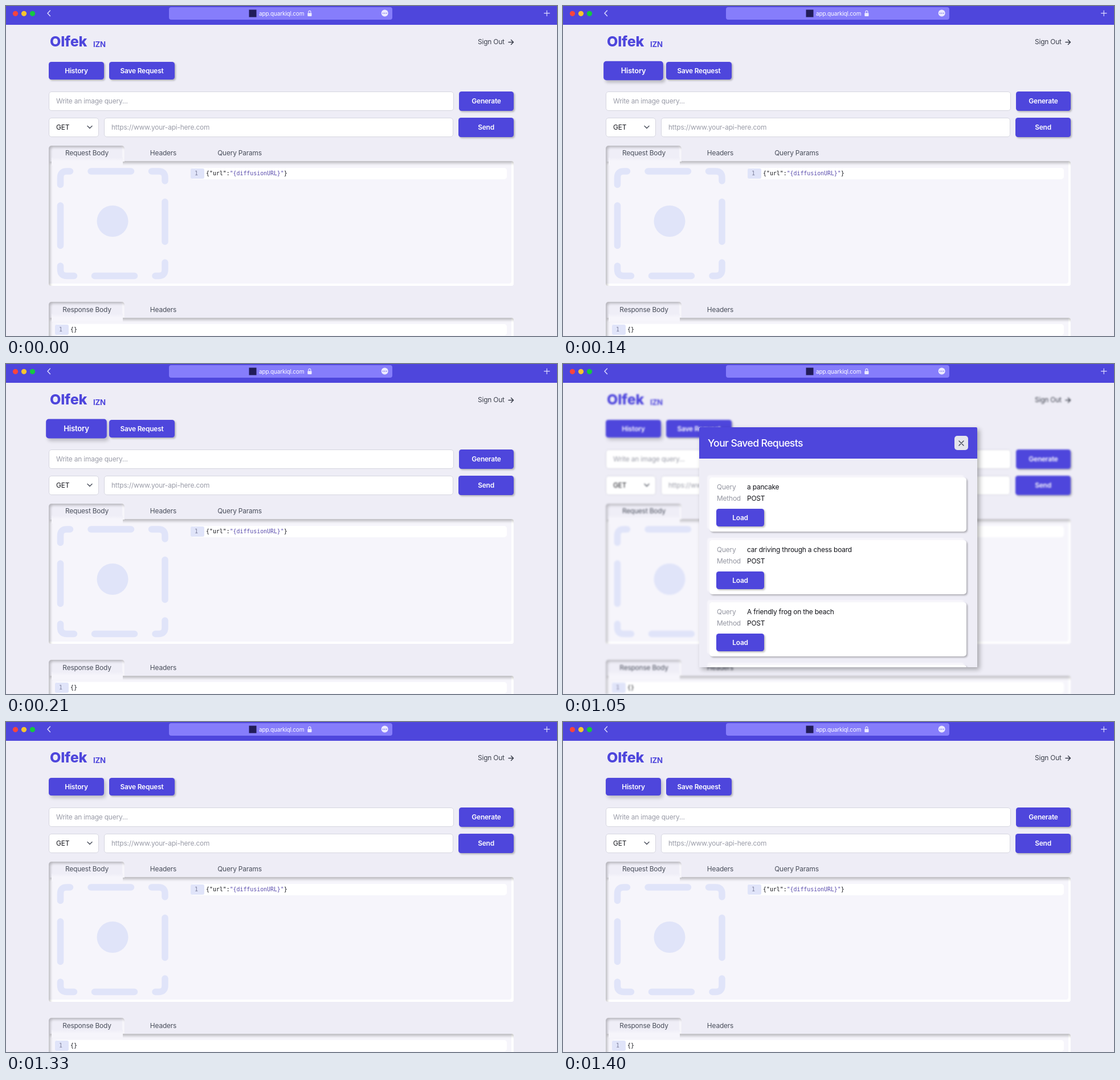
Animation, 967 px wide and 579 px high, one loop 2.17 s. Source, as an HTML page:

```html
<!DOCTYPE html>
<html lang="en">
<head>
<meta charset="utf-8">
<title>Saved requests</title>
<style>
:root { --indigo: #4e46dc; --bg: #eeedf6; --panel: #f6f5fb; --pale: #e0e4f9; --loop: 2170ms step-end infinite; }
html, body { margin: 0; width: 100%; height: 100%; overflow: hidden; background: var(--bg); }
body { position: relative; font: 11.9px/20px Inter, sans-serif; letter-spacing: -.015em; color: #111218; }
div, span, svg { position: absolute; box-sizing: border-box; white-space: pre; }
svg { left: 0; top: 0; width: 967px; height: 579px; fill: none; stroke-linecap: round; stroke-linejoin: round; }
.stage { left: 0; top: 0; width: 967px; height: 579px; overflow: hidden; }

.bar { left: 0; top: 0; width: 967px; height: 33px; background: var(--indigo); }
.pill { left: 286px; top: 2px; width: 392px; height: 22px; border-radius: 4px; background: #867dfb; }
.address { left: 444px; top: 3px; font-size: 10px; color: #fff; }

.button { display: flex; align-items: center; justify-content: center; border-radius: 4.5px;
  background: var(--indigo); color: #fff; font-weight: 600; box-shadow: 2px 2px 3px #00000040; }
.field { background: #fff; border: 1px solid #d6d6e0; border-radius: 5px; }
.field span { left: 12px; top: 6px; color: #9a9ca8; }
.label { width: 134px; text-align: center; color: #4a4f5c; }
.brand { left: 77px; top: 46px; font-weight: 800; font-size: 25px; line-height: 32px; color: var(--indigo); }
.brand-tail { left: 153px; top: 51px; font-weight: 700; font-size: 13.2px; line-height: 32px; color: var(--indigo); }

.tab { left: 75px; width: 133px; height: 28px; border-radius: 5px 5px 0 0; background: #efeef7;
  box-shadow: inset 3px 3px 4px #0000003a, inset -4px 0 2px #f7f6fb; }
.panel { left: 75px; width: 816px; height: 219px; border-radius: 0 4px 4px 4px; background: var(--panel);
  box-shadow: inset 3px 4px 4px #00000038, inset -4px -4px 1px #fff; }
.join { left: 80px; width: 125px; height: 14px; background: linear-gradient(#efeef7, var(--panel) 45%); }
.code { height: 20px; background: #fff; border-radius: 5px; font: 9.9px/19px "DejaVu Sans Mono", monospace; letter-spacing: 0; }
.code span { left: 27px; }
.code .gutter { left: 0; top: 1px; width: 24px; height: 18px; padding-right: 4px; text-align: center; line-height: 18px;
  border-radius: 3px; background: var(--pale); color: #7c7f9c; }
.code i { font-style: normal; color: #5a4cad; }

.modal { left: 239px; top: 111px; width: 488px; height: 421px; background: var(--bg); box-shadow: 4px 4px 8px #0000004d; }
.clip { inset: 0; overflow: hidden; }
.head { left: 0; top: 0; width: 488px; height: 55px; background: var(--indigo); border-radius: 2px 2px 0 0; }
.title { left: 15px; top: 13px; font-size: 17.6px; line-height: 30px; font-weight: 500; letter-spacing: -.6px; color: #fff; }
.card { left: 18px; width: 451px; height: 95px; border-radius: 5px; background: #fff;
  box-shadow: 2px 2px 3px #00000045, -4px -4px 2px #f7f6fb; }
.card span { left: 66px; }
.card .key { left: 13px; color: #9496a1; }
.card .button { left: 12px; top: 55px; width: 84px; height: 31px; }
.close-box { left: 448px; top: 15px; width: 24px; height: 25px; border-radius: 5px; background: #e4e5ec; }

.page { animation: blur var(--loop); }
.history { animation: hover var(--loop); }
.modal { animation: open var(--loop); }
.close-box { animation: point var(--loop); }
.cross { stroke: #fff; animation: darken var(--loop); }
@keyframes hover {
  0% { transform: none; }
  3.22% { transform: scale(1.025); box-shadow: 2px 3px 4px #0000003a; }
  6.45% { transform: scale(1.08); box-shadow: 3px 4px 5px #00000036; }
  9.67%, 19.35% { transform: scale(1.1); box-shadow: 3px 4px 6px #00000036; }
  48.38%, 100% { transform: none; }
}
@keyframes blur { 0%, 61.29%, 100% { filter: none; } 19.35% { filter: blur(1.8px); } }
@keyframes open { 0%, 61.29%, 100% { opacity: 0; } 19.35% { opacity: 1; } }
@keyframes point { 0%, 61.29%, 100% { opacity: 0; } 48.38% { opacity: 1; } }
@keyframes darken { 0%, 61.29%, 100% { stroke: #fff; } 48.38% { stroke: #3f4553; } }
</style>
</head>
<body>
<div class="stage page">
  <span class="brand">Olfek</span><span class="brand-tail">IZN</span>
  <span style="left:828px;top:53px;color:#3c404c">Sign Out</span>

  <div class="button history" style="left:75px;top:98px;width:97px;height:31px">History</div>
  <div class="button" style="left:181px;top:98px;width:115px;height:31px">Save Request</div>
  <div class="field" style="left:75px;top:150px;width:711px;height:34px"><span>Write an image query...</span></div>
  <div class="button" style="left:795px;top:150px;width:96px;height:34px">Generate</div>
  <div class="field" style="left:75px;top:196px;width:88px;height:34px"><span style="color:#17181f">GET</span></div>
  <div class="field" style="left:172px;top:196px;width:613px;height:34px"><span>https://www.your-api-here.com</span></div>
  <div class="button" style="left:794px;top:196px;width:97px;height:34px">Send</div>

  <div class="panel" style="top:272px"></div>
  <div class="tab" style="top:245px"></div>
  <div class="join" style="top:266px"></div>
  <span class="label" style="left:75px;top:248px">Request Body</span>
  <span class="label" style="left:209px;top:248px">Headers</span>
  <span class="label" style="left:343px;top:248px">Query Params</span>
  <div class="code" style="left:324px;top:284px;width:555px"><span class="gutter">1</span><span>{"url":<i>"{diffusionURL}"</i>}</span></div>

  <div class="panel" style="top:547px"></div>
  <div class="tab" style="top:519px"></div>
  <div class="join" style="top:540px"></div>
  <span class="label" style="left:75px;top:523px">Response Body</span>
  <span class="label" style="left:209px;top:523px">Headers</span>
  <div class="code" style="left:86px;top:558px;width:793px"><span class="gutter">1</span><span>{}</span></div>

  <svg viewBox="0 0 967 579">
    <path d="M882 63.5H890.5M886.5 59.5L890.5 63.5L886.5 67.5" stroke="#3c404c" stroke-width="1.5"/>
    <path d="M143 210.5L147 214.5L151 210.5" stroke="#4a4f5c" stroke-width="1.4"/>
    <g stroke="#e0e4f9" stroke-width="11.5">
      <path d="M95.5 313.5V301Q95.5 290 106.5 290H112.5M149 290H219.5M255.5 290H268Q279 290 279 301V307"/>
      <path d="M95.5 350V420.5M279 343.5V413.5"/>
      <path d="M95.5 456V462.5Q95.5 473.5 106.5 473.5H119.5M155.5 473.5H225.5M262 473.5H268Q279 473.5 279 462.5V450"/>
    </g>
    <circle cx="187" cy="377.5" r="27.5" fill="#e0e4f9"/>
  </svg>
</div>

<div class="bar">
  <div class="pill"></div>
  <span class="address">app.quarkiql.com</span>
  <svg viewBox="0 0 967 579">
    <circle cx="16.5" cy="13.3" r="4.6" fill="#fb443c"/>
    <circle cx="31.5" cy="13.3" r="4.6" fill="#f8c52f"/>
    <circle cx="46.5" cy="13.3" r="4.6" fill="#14c840"/>
    <path d="M77.5 8L73 12.8L77.5 17.6" stroke="#dedcff" stroke-width="1.4"/>
    <rect x="426.5" y="6.5" width="13" height="13" fill="#211c58"/>
    <rect x="529.3" y="12.2" width="7.2" height="5.8" rx="1" fill="#ebe9ff"/>
    <path d="M530.9 12V10.4a2 2 0 0 1 4 0V12" stroke="#ebe9ff" stroke-width="1.1"/>
    <circle cx="664.7" cy="12.6" r="6" fill="#ebe9ff"/>
    <path d="M661.7 12.6h0M664.7 12.6h0M667.7 12.6h0" stroke="#6d64e8" stroke-width="1.7"/>
    <path d="M944.5 12.7H954M949.2 8V17.4" stroke="#dedcff" stroke-width="1.2"/>
  </svg>
</div>

<div class="modal">
  <div class="clip" id="list"></div>
  <div class="head">
    <span class="title">Your Saved Requests</span>
    <div class="close-box"></div>
    <svg viewBox="0 0 967 579"><path class="cross" d="M456 24L464 32M464 24L456 32" stroke-width="1.4"/></svg>
  </div>
</div>

<script>
const queries = ["a pancake", "car driving through a chess board", "A friendly frog on the beach", ""];
const card = (query, i) => `<div class="card" style="top:${Math.round(88 + i * 109.7)}px">
  <span class="key" style="top:7px">Query</span><span style="top:7px">${query}</span>
  <span class="key" style="top:27px">Method</span><span style="top:27px">POST</span>
  <div class="button">Load</div></div>`;
document.getElementById("list").innerHTML = queries.map(card).join("");
</script>
</body>
</html>
```
